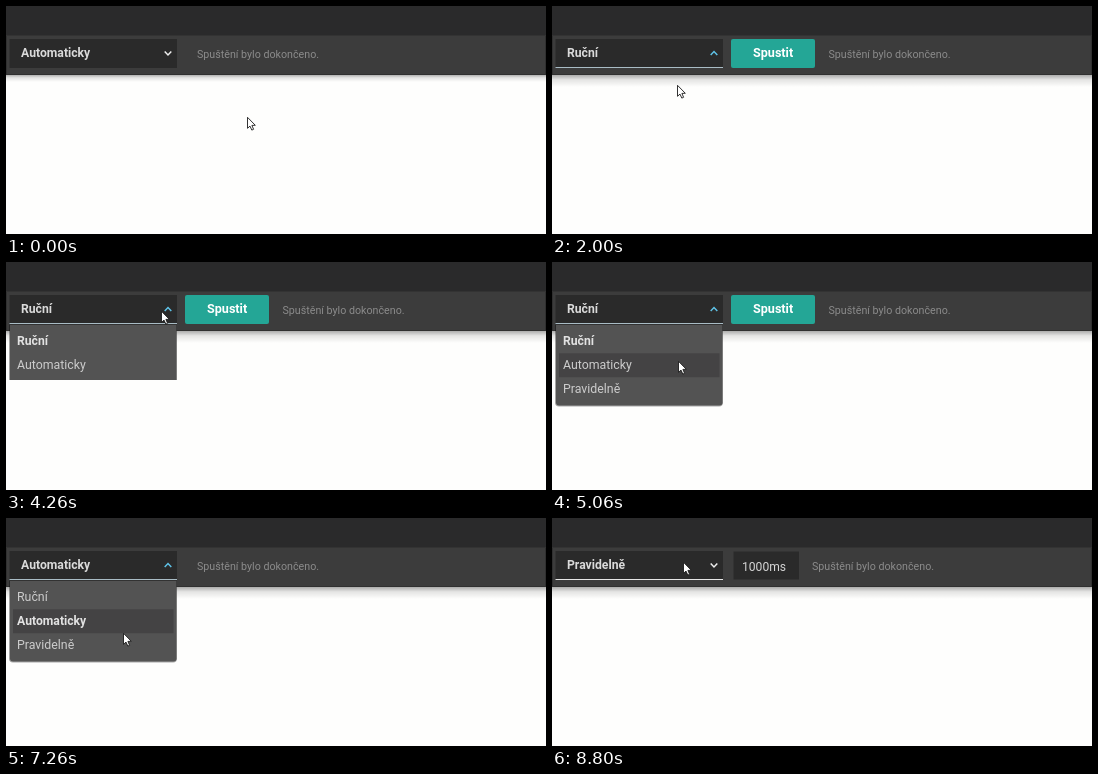
An HTML page with a canvas for the animation above (9.26 s loop, 540 by 228 pixels).

```html
<!DOCTYPE html>
<html lang="cs">
<head>
<meta charset="utf-8">
<title>Režim spuštění</title>
<style>
html, body { margin: 0; width: 100%; height: 100%; overflow: hidden; background: #fefefd; }
canvas { display: block; width: 540px; height: 228px; }
</style>
</head>
<body>
<canvas id="stage"></canvas>
<script>
const W = 540, H = 228, LOOP = 9260, FPS = 15;
const canvas = document.getElementById('stage');
const ctx = canvas.getContext('2d');
const dpr = window.devicePixelRatio || 1;
canvas.width = W * dpr;
canvas.height = H * dpr;

const FONT = 'Roboto, "Noto Sans", sans-serif';
const MODES = ['Ruční', 'Automaticky', 'Pravidelně'];
const STATUS_X = [276.5, 191, 260];

// Pointer stops: [tick, x, y]
const PATH = [
  [3, 241, 111], [15, 159, 45], [18, 159, 45], [25, 125, 79],
  [35, 125, 79], [43, 225, 46], [50, 225, 46], [55, 179, 58],
  [61, 155, 49], [69, 155, 49], [74, 127, 101], [76, 126, 99],
  [89, 126, 99], [99, 161, 44], [103, 161, 44], [109, 117, 115],
  [111, 117, 125], [127, 117, 125], [132, 131, 44]
];

// Menu openings: [first tick, closing tick, mode chosen]
const MENUS = [[18, 30, 0], [64, 78, 1], [102, 113, 2]];

function pointerAt(n) {
  if (n <= PATH[0][0]) return PATH[0].slice(1);
  for (let i = 1; i < PATH.length; i++) {
    const [n0, x0, y0] = PATH[i - 1], [n1, x1, y1] = PATH[i];
    if (n <= n1) {
      const u = (n - n0) / (n1 - n0);
      const e = u * u * (3 - 2 * u);
      return [x0 + (x1 - x0) * e, y0 + (y1 - y0) * e];
    }
  }
  return PATH[PATH.length - 1].slice(1);
}

function rect(x, y, w, h, fill, r = 0) {
  ctx.fillStyle = fill;
  ctx.beginPath();
  ctx.roundRect(x, y, w, h, r);
  ctx.fill();
}

function text(s, x, y, size, fill, weight = 400) {
  ctx.font = `${weight} ${size}px ${FONT}`;
  ctx.fillStyle = fill;
  ctx.fillText(s, x, y);
}

function chevron(up) {
  const d = up ? -1 : 1;
  ctx.strokeStyle = up ? '#5fc3e8' : '#eeeeee';
  ctx.lineWidth = 1.5;
  ctx.beginPath();
  ctx.moveTo(158.7, 47.3 - 1.7 * d);
  ctx.lineTo(162, 47.3 + 1.7 * d);
  ctx.lineTo(165.3, 47.3 - 1.7 * d);
  ctx.stroke();
}

function drawPage(deep) {
  rect(0, 0, W, H, '#fefefd');
  const depth = deep ? 12 : 7;
  const g = ctx.createLinearGradient(0, 69, 0, 69 + depth);
  g.addColorStop(0, deep ? 'rgba(0,0,0,.32)' : 'rgba(0,0,0,.3)');
  g.addColorStop(0.4, 'rgba(0,0,0,.1)');
  g.addColorStop(1, 'rgba(0,0,0,0)');
  rect(0, 69, W, depth, g);
  rect(0, 0, W, 30, '#2a2a2b');
  rect(0, 29.5, W, 39.5, '#3c3c3c');
  rect(0, 68, W, 1, '#303030');
  rect(0, 30, 1, 39, '#303030');
  rect(W - 1, 30, 1, 39, '#303030');
}

function drawSelect(mode, up, lined) {
  rect(3.5, 33, 167.5, 29, '#2a2a2a');
  if (lined) rect(3.5, 61, 167.5, 1, up ? '#a9bcc5' : '#e6e6e6');
  text(MODES[mode], 15, 51, 12.2, '#dadada', 700);
  chevron(up);
}

function drawButton(hover, press, shrunk) {
  if (hover || press) {
    const top = press ? 30 : 31;
    rect(179, top, 84, 63 - top, press ? 'rgba(36,166,150,.55)' : 'rgba(36,166,150,.3)', 2);
  }
  if (hover || press || shrunk) rect(180.5, 34, 81.5, 27.5, '#24a696', 1);
  else rect(179, 33, 84, 29, '#24a696', 2);
  text('Spustit', 201, 51, 12.6, '#ffffff', 700);
}

function drawMenu(selected, row, height) {
  ctx.save();
  ctx.beginPath();
  ctx.rect(0, 62, 180, height + 1);
  ctx.clip();
  rect(3, 62.5, 168, 82, 'rgba(0,0,0,.35)', [0, 0, 4, 4]);
  rect(4, 63, 166.5, 80.5, '#535353', [0, 0, 3, 3]);
  if (row >= 0) rect(7, 67 + row * 24.2, 160.5, 24, '#444344');
  MODES.forEach((s, i) => {
    const on = i === selected;
    text(s, 11, 83 + i * 24, on ? 12.2 : 12.35, on ? '#e2e2e2' : '#cccccc', on ? 700 : 400);
  });
  ctx.restore();
}

function drawPointer(x, y) {
  ctx.save();
  ctx.translate(x + 0.5, y + 0.3);
  ctx.beginPath();
  [[0, 0], [0, 11], [2.5, 8.8], [4.3, 12.8], [6.1, 12], [4.4, 8.1], [7.8, 8]]
    .forEach(p => ctx.lineTo(...p));
  ctx.closePath();
  ctx.fillStyle = '#ffffff';
  ctx.fill();
  ctx.strokeStyle = '#1c1c1c';
  ctx.lineWidth = 0.9;
  ctx.stroke();
  ctx.restore();
}

function draw(n) {
  const [x, y] = pointerAt(n);
  let mode = 1, menu = null, closing = false;
  for (const m of MENUS) {
    if (n >= m[1]) {
      mode = m[2];
      closing = closing || (n === m[1] && mode !== 1);
    } else if (n >= m[0]) menu = m;
  }
  const up = !!menu || closing;
  const overSelect = x >= 3 && x < 171 && y >= 33 && y < 62;
  const overButton = x >= 180 && x < 263 && y >= 33 && y < 62;

  drawPage(n >= 18);
  drawSelect(mode, up, up || overSelect);
  if (mode === 0) drawButton(overButton, n >= 45 && n < 47, n >= 47 && n < 61);
  if (mode === 2) {
    rect(181.5, 33.5, 65.5, 28, '#2a2a2a');
    text('1000ms', 190, 52.5, 12.1, '#d6d6d6');
  }
  text('Spuštění bylo dokončeno.', STATUS_X[mode], 52.3, 10.7, '#8b8b8b');
  if (menu) {
    const row = y < 67 ? -1 : Math.min(2, Math.floor((y - 67) / 24.2));
    drawMenu(mode, row, n === menu[0] ? 55 : 83);
  }
  drawPointer(x, y);
}

const start = performance.now();
function frame() {
  const t = Math.max(0, performance.now() - start) % LOOP;
  ctx.setTransform(dpr, 0, 0, dpr, 0, 0);
  // The screen refreshes in ticks of 1/15 s
  draw(Math.floor((t + 7) * FPS / 1000));
  requestAnimationFrame(frame);
}
frame();
</script>
</body>
</html>
```
